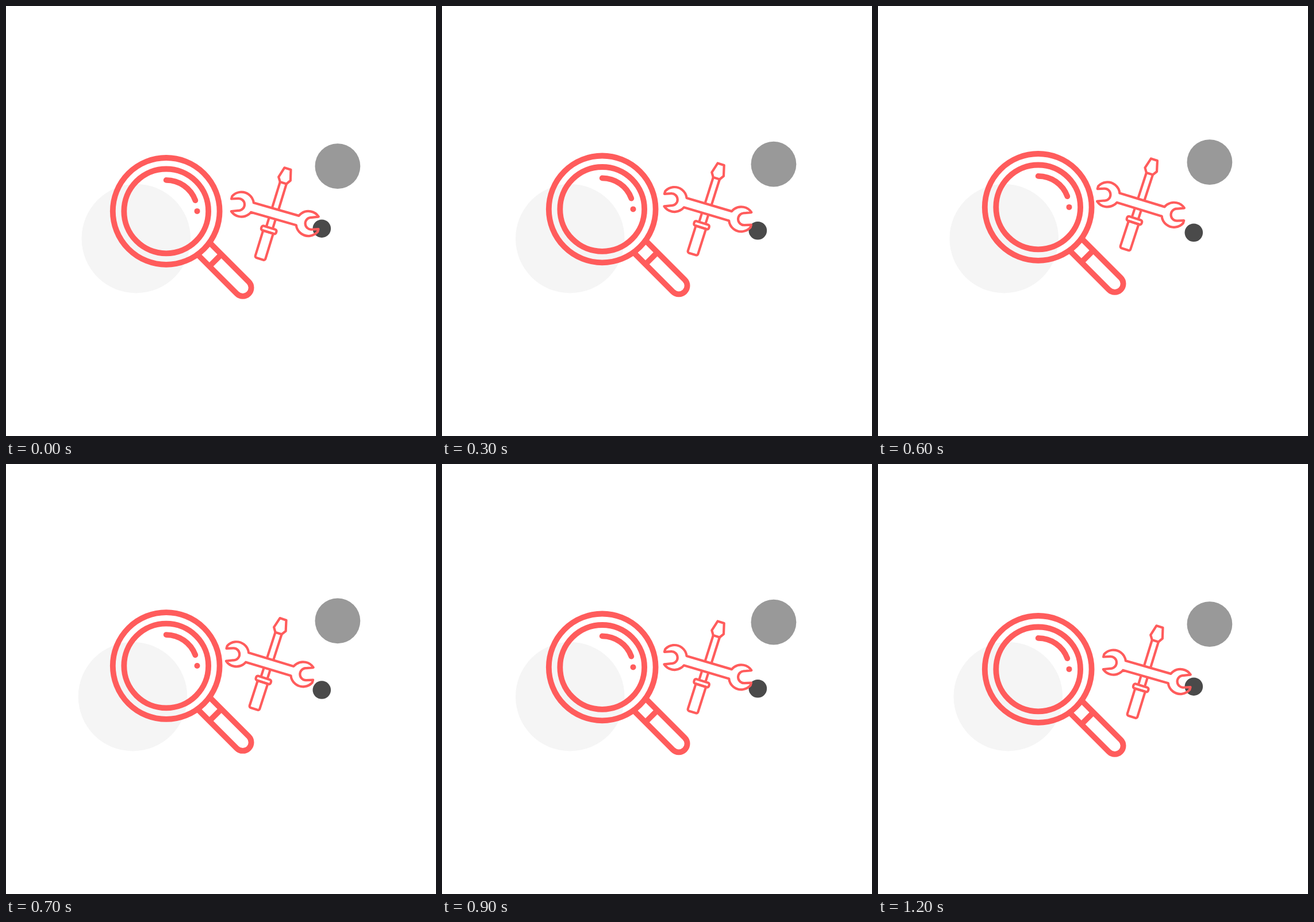
Write an HTML page with a canvas that moves like this. It is 748x748 px and loops after 1.3 s.

```html
<!DOCTYPE html>
<html lang="en">
<head>
<meta charset="utf-8">
<title>Search and tools</title>
<style>
  html, body { margin: 0; width: 100%; height: 100%; overflow: hidden; background: #fff; }
  canvas { display: block; width: 748px; height: 748px; }
</style>
</head>
<body>
<canvas id="stage"></canvas>
<script>
const SIZE = 748, STEP = 100, HALF = 6, LOOP = 1300;
const RED = '#ff5c5c';
const canvas = document.getElementById('stage');
const ctx = canvas.getContext('2d');
const ratio = window.devicePixelRatio || 1;
canvas.width = canvas.height = SIZE * ratio;

function disc(x, y, r, color) {
  ctx.fillStyle = color;
  ctx.beginPath();
  ctx.arc(x, y, r, 0, Math.PI * 2);
  ctx.fill();
}

function ring(r) {
  ctx.beginPath();
  ctx.arc(0, 0, r, 0, Math.PI * 2);
  ctx.stroke();
}

function poly(points, closed) {
  ctx.beginPath();
  points.forEach(([x, y]) => ctx.lineTo(x, y));
  if (closed) ctx.closePath();
  ctx.stroke();
}

function box(x, y, w, h, r) {
  ctx.beginPath();
  ctx.roundRect(x, y, w, h, r);
  ctx.stroke();
}

function pen(width) {
  ctx.strokeStyle = RED;
  ctx.lineWidth = width;
  ctx.lineJoin = 'round';
}

function magnifier(x, y) {
  ctx.save();
  ctx.translate(x, y);
  pen(9.8);
  ring(92.9);
  ring(73.4);

  ctx.lineCap = 'round';
  ctx.beginPath();
  ctx.arc(0, 0, 54, -Math.PI / 2, -0.355);
  ctx.stroke();
  disc(53.8, 0, 5, RED);

  ctx.lineCap = 'butt';
  ctx.rotate(Math.PI / 4);
  ctx.beginPath();
  ctx.moveTo(92, -14.7);
  ctx.arc(188.4, 0, 14.7, -Math.PI / 2, Math.PI / 2);
  ctx.lineTo(92, 14.7);
  ctx.stroke();
  poly([[121, -14.7], [121, 14.7]]);
  ctx.restore();
}

// One open-jawed end; the other is the same turned by half a circle.
function wrenchEnd() {
  const hx = -60.6;
  ctx.lineTo(hx + 19.7, -8.5);
  ctx.arc(hx, 0, 21.5, -0.407, -2.7, true);
  ctx.lineTo(hx - 19.4, -4.4);
  ctx.arc(hx - 4.8, 1.6, 10.5, -1.92, 1.35);
  ctx.lineTo(hx - 13.2, 16.2);
  ctx.arc(hx, 0, 21.5, 2.26, 0.407, true);
}

function wrench() {
  ctx.save();
  ctx.beginPath();
  wrenchEnd();
  ctx.rotate(Math.PI);
  wrenchEnd();
  ctx.closePath();
  ctx.stroke();
  ctx.restore();
}

function screwdriver() {
  ctx.save();
  ctx.translate(-2, 0);
  ctx.rotate(0.019);
  poly([[-5.8, -81.8], [5.8, -81.8], [10.8, -63.5], [5.8, -56], [-5.8, -56], [-10.8, -63.5]], true);
  for (const x of [-5.8, 5.8]) {
    poly([[x, -56], [x, -8.5]]);
    poly([[x, 8.5], [x, 25.5]]);
  }
  box(-13.5, 25.5, 27, 8, 3);
  box(-9.2, 33.5, 18.4, 48.7, [0, 0, 3, 3]);
  ctx.restore();
}

function tools(x, y, degrees) {
  ctx.save();
  ctx.translate(x, y);
  ctx.rotate(degrees * Math.PI / 180);
  pen(4.2);
  ctx.lineCap = 'butt';
  wrench();
  screwdriver();
  ctx.restore();
}

function draw(ms) {
  const step = Math.floor((ms % LOOP) / STEP);
  const k = step <= HALF ? step : 2 * HALF - step;
  const drift = k * 1.17;

  ctx.setTransform(ratio, 0, 0, ratio, 0, 0);
  ctx.fillStyle = '#fff';
  ctx.fillRect(0, 0, SIZE, SIZE);
  disc(226.3 - drift, 404.6, 94.8, '#f5f5f5');
  disc(576.9, 278.7 - drift, 39.4, '#999');
  disc(549.3, 387.2 + drift, 15.8, '#4a4a4a');
  magnifier(278.7, 356.9 - drift);
  tools(467.8 - k * 1.8, 361.8 - k * 2.7, 16 + k * 0.16);
}

const start = performance.now();
function tick(now) {
  draw(Math.max(0, now - start));
  requestAnimationFrame(tick);
}
draw(0);
requestAnimationFrame(tick);
</script>
</body>
</html>
```
